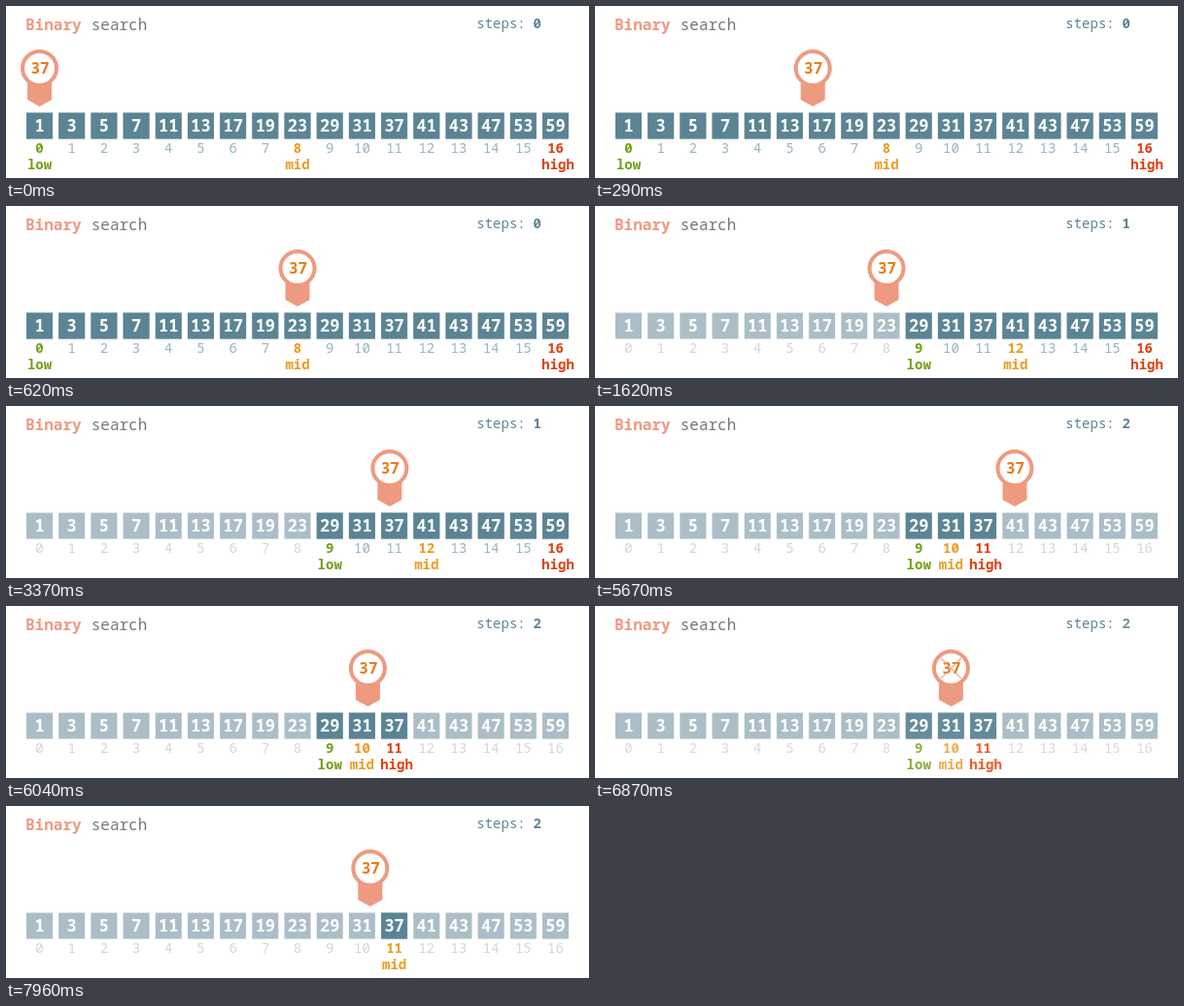
An HTML page with a canvas that plays this animation: 600x178 px, repeating every 8 s.

```html
<!DOCTYPE html>
<html lang="en">
<head>
<meta charset="utf-8">
<title>Binary search</title>
<style>
  html, body { margin: 0; width: 100%; height: 100%; overflow: hidden; background: #fff; }
  canvas { display: block; width: 600px; height: 178px; }
</style>
</head>
<body>
<canvas id="stage"></canvas>
<script>
const LOOP = 8000, TICK = 41, MOVE = 600;
const primes = [1, 3, 5, 7, 11, 13, 17, 19, 23, 29, 31, 37, 41, 43, 47, 53, 59];
const color = {
  dark: '#5b8494', light: '#abbdc6', index: '#97b3c0', faded: '#ccd8dc',
  low: '#74a01c', mid: '#ee9a22', high: '#e0400f',
  pin: '#ee9a80', target: '#e67e16', title: '#777777'
};

// Search ranges; a closed one only keeps its middle label.
const states = [
  { low: 0, mid: 8, high: 16, steps: 0 },
  { low: 9, mid: 12, high: 16, steps: 1 },
  { low: 9, mid: 10, high: 11, steps: 2 },
  { low: 11, mid: 11, high: 11, steps: 2 }
];
const changes = [[1250, 1620], [4170, 4580], [6670, 7080]];

// begin: easing origin, first/last: visible span of the move
const moves = [
  { begin: 32, first: 40, last: 620, to: 8 },
  { begin: 3112, first: 3120, last: 3710, to: 12 },
  { begin: 5656, first: 5670, last: 6210, to: 10 },
  { begin: 7852, first: 7920, last: 8420, to: 11 }
];

const canvas = document.getElementById('stage');
const ctx = canvas.getContext('2d');
const ratio = window.devicePixelRatio || 1;
canvas.width = 600 * ratio;
canvas.height = 178 * ratio;

const clamp = v => Math.max(0, Math.min(1, v));
const cellX = i => 34.5 + i * 33.19;
const bezier = (a, b, s) => 3 * a * s * (1 - s) ** 2 + 3 * b * s * s * (1 - s) + s ** 3;

// cubic-bezier(.25, .1, .25, 1)
function ease(p) {
  let lo = 0, hi = 1;
  for (let n = 0; n < 20; n++) {
    const s = (lo + hi) / 2;
    if (bezier(0.25, 0.25, s) < p) lo = s; else hi = s;
  }
  return bezier(0.1, 1, lo);
}

function pinX(t) {
  let at = 0;
  for (const m of moves) {
    if (t < m.first) break;
    const held = m.first + Math.floor((t - m.first + 2) / TICK) * TICK;
    const k = t >= m.last ? 1 : ease(clamp((held - m.begin) / MOVE));
    at += (m.to - at) * k;
  }
  return cellX(at);
}

function text(str, x, y, size, weight, fill, align = 'center') {
  ctx.font = `${weight} ${size}px "Noto Sans Mono", "DejaVu Sans Mono", monospace`;
  ctx.textAlign = align;
  ctx.fillStyle = fill;
  ctx.fillText(str, x, y);
}

function drawState(s, alpha) {
  if (alpha <= 0) return;
  ctx.globalAlpha = alpha;
  const open = s.low < s.high;
  const marks = open ? ['low', 'mid', 'high'] : ['mid'];
  primes.forEach((_, i) => {
    const x = cellX(i);
    const inside = i >= s.low && i <= s.high;
    if (inside) {
      ctx.fillStyle = color.dark;
      ctx.fillRect(x - 13.5, 110.5, 27, 27);
    }
    const mark = marks.find(m => s[m] === i);
    const fill = color[mark || (inside ? 'index' : 'faded')];
    text(i, x, 152, 14, mark ? 700 : 400, fill);
    if (mark) text(mark, x + (mark === 'high' ? 2.5 : 0), 169, 14, 700, fill);
  });
  text(s.steps, 542.6, 22.5, 14, 600, color.dark, 'left');
  ctx.globalAlpha = 1;
}

function drawCross(x, y, u) {
  ctx.globalAlpha = u < 0.4 ? 0.6 + u : clamp((1 - u) / 0.6);
  ctx.strokeStyle = color.pin;
  ctx.lineWidth = 1.2;
  ctx.beginPath();
  for (const d of [-1, 1]) {
    ctx.moveTo(x - 10.5, y - 10.5 * d);
    ctx.lineTo(x + 10.5, y + 10.5 * d);
  }
  ctx.stroke();
  ctx.globalAlpha = 1;
}

function drawPin(x, crossing) {
  const y = 64.5;
  ctx.fillStyle = color.pin;
  ctx.beginPath();
  for (const [dx, py] of [[-12.5, 79], [12.5, 79], [12.5, 97], [0, 104], [-12.5, 97]]) {
    ctx.lineTo(x + dx, py);
  }
  ctx.fill();
  ctx.beginPath();
  ctx.arc(x, y, 17.5, 0, Math.PI * 2);
  ctx.fillStyle = '#fff';
  ctx.fill();
  ctx.strokeStyle = color.pin;
  ctx.lineWidth = 4;
  ctx.stroke();
  text('37', x + 0.5, 70, 16, 600, color.target);
  if (crossing >= 0) drawCross(x, y, crossing);
}

function draw(t) {
  ctx.setTransform(ratio, 0, 0, ratio, 0, 0);
  ctx.fillStyle = '#fff';
  ctx.fillRect(0, 0, 600, 178);

  text('Binary', 20, 24.5, 16, 700, color.pin, 'left');
  text('search', 87.7, 24.5, 16, 400, color.title, 'left');
  text('steps:', 484.3, 22.5, 14, 400, color.dark, 'left');

  let current = 0, blend = 0, crossing = -1;
  for (const [from, to] of changes) {
    if (t >= to) current++;
    else if (t >= from) {
      crossing = (t - from) / (to - from);
      blend = clamp((crossing - 0.4) / 0.6);
    }
  }

  ctx.fillStyle = color.light;
  primes.forEach((_, i) => ctx.fillRect(cellX(i) - 13.5, 110.5, 27, 27));
  drawState(states[current], 1 - blend);
  if (blend > 0) drawState(states[current + 1], blend);
  primes.forEach((n, i) => text(n, cellX(i), 129.5, 17, 600, '#fff'));
  drawPin(pinX(t), crossing);
}

const start = performance.now();
function frame() {
  draw((performance.now() - start) % LOOP);
  requestAnimationFrame(frame);
}
frame();
</script>
</body>
</html>
```
